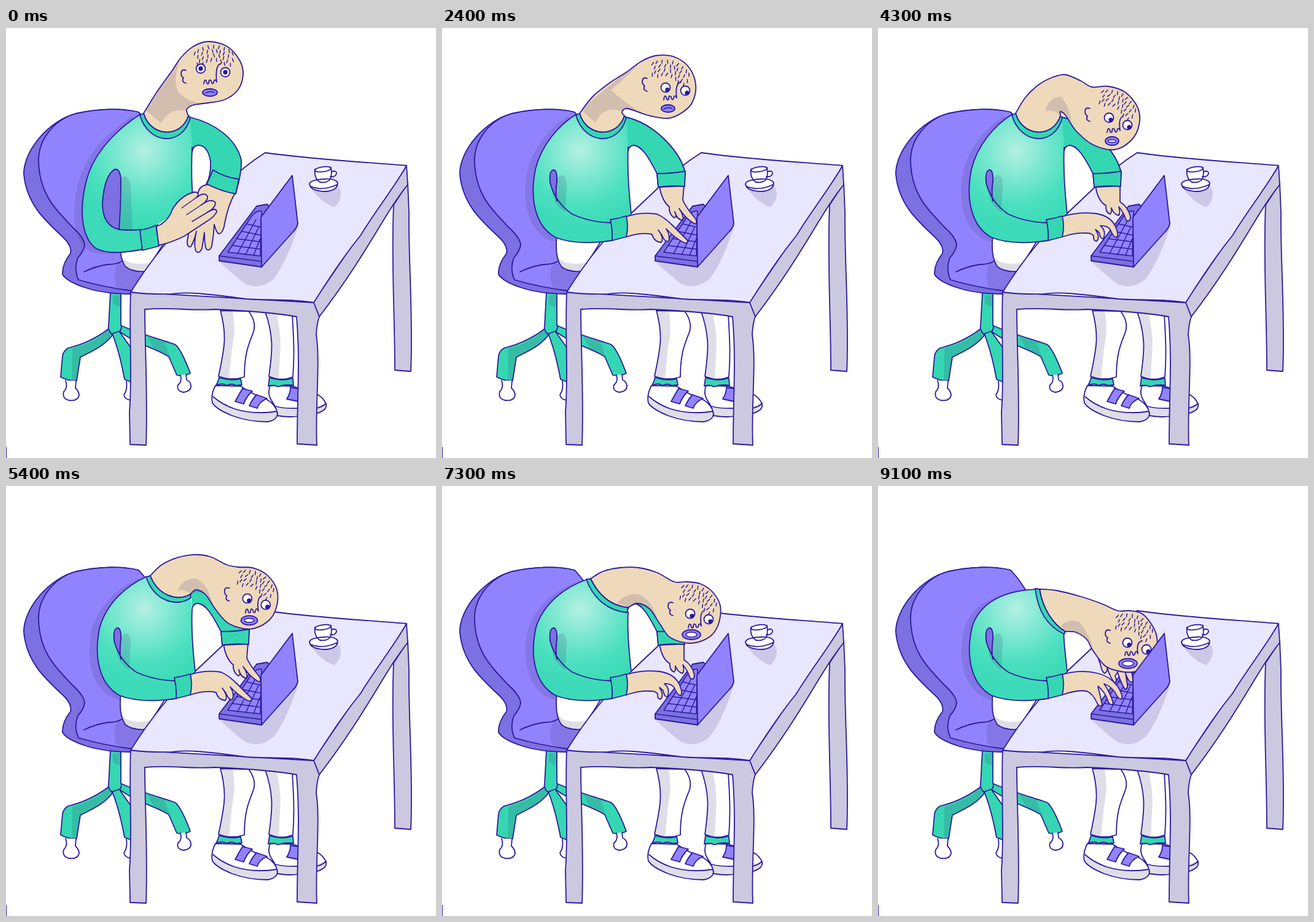
Animation of 700x700 px, one loop 9.17 s. Source, as an HTML page:

```html
<!DOCTYPE html>
<html lang="en">
<head>
<meta charset="utf-8">
<title>Slumping at the desk</title>
<style>
html, body { margin: 0; width: 100%; height: 100%; overflow: hidden; background: #fff; }
svg { display: block; width: 100vw; height: 100vh; }
path, ellipse, circle { fill: none; stroke: #2b1a9c; stroke-width: 1.8; stroke-linejoin: round; stroke-linecap: round; }
.violet { fill: #9183fd; } .deep { fill: #7d70e2; }
.teal { fill: #34d7b1; } .shirt { fill: url(#dye); stroke: none; }
.skin { fill: #efd9bb; } .white { fill: #fff; }
.top { fill: #e9e6ff; } .side { fill: #cbc8e0; } .ink { fill: #2b1a9c; }
.shade { fill: #403a70; fill-opacity: .17; stroke: none; }
.thin { stroke-width: 1.5; }
.bare { stroke: none; }
</style>
</head>
<body>
<svg viewBox="0 0 700 700">
<defs>
  <radialGradient id="dye" gradientUnits="userSpaceOnUse" cx="225" cy="200" r="125">
    <stop offset="0" stop-color="#b4f1e3"/><stop offset=".35" stop-color="#7ee8d1"/>
    <stop offset=".7" stop-color="#4be0bf"/><stop offset="1" stop-color="#3cdab8"/>
  </radialGradient>
</defs>
<path class="ink bare" d="M0,682h1v18h-1z"/>

<!-- chair -->
<path class="teal" d="M173,498C182,520 188,545 193,572L203,576V520L183,492Z"/>
<path class="teal" d="M184,483C215,497 245,505 275,515Q285,522 300,562Q290,568 278,565L265,535C245,522 215,516 183,493Z"/>
<path class="teal" d="M168,489C150,503 130,514 101,521Q93,526 92,534L89,568Q101,575 115,574L121,536C140,526 160,518 174,499Z"/>
<path class="teal" d="M170,430L167,485Q165,491 172,498L186,493Q189,488 187,483L187,430Z"/>
<path class="shade" d="M108,522Q145,512 167,491L173,499C160,518 140,526 121,536L115,573L107,573Q108,535 108,522M230,502L258,511L266,534L240,521ZM174,435H186V455L174,450Z"/>
<path class="white" d="M97,574Q101,585 94,592Q91,603 102,606Q117,608 119,598Q119,592 113,586L114,574M284,565Q287,576 280,581Q277,591 289,593Q302,591 301,582Q300,575 294,573L293,564M196,575Q198,589 192,597Q193,605 204,606"/>
<path class="deep" d="M216,137C190,130 150,131 115,139C70,150 28,200 29,238C33,285 62,312 90,338Q108,354 105,367Q91,385 92,401Q99,413 130,423Q160,433 206,433L250,400L241,170Z"/>
<path class="violet" d="M216,137C190,130 150,131 115,139C75,150 52,185 53,218C55,270 78,292 108,324Q128,342 128,354Q126,364 117,374Q110,392 118,410C145,418 175,424 206,428L250,395L241,171Q232,154 216,137Z"/>
<path class="shade" d="M182,380Q172,402 180,422L206,428L226,397Q198,398 190,385Z"/>
<path d="M127,397Q145,388 165,385Q180,385 188,380"/>
<g id="cast"></g>

<!-- trousers and shoes -->
<path class="white" d="M187,338Q183,372 194,388Q205,398 228,396L260,345Z"/>
<path class="shade" d="M187,372Q188,389 202,394L228,395L236,382Q200,388 187,372Z"/>
<path class="white" d="M349,460C360,500 356,520 346,567Q368,575 388,568C388,530 395,515 402,497Q409,480 395,461ZM422,462C437,505 433,530 428,567Q448,576 467,568C470,530 468,500 466,466Z"/>
<path class="shade" d="M350,461H369Q375,490 368,520L363,571L347,567C357,520 360,500 350,461M423,463H440Q449,500 446,530L444,572L429,567C434,530 436,500 423,463"/>
<path class="white" d="M341,582Q333,597 336,610Q341,620 368,631Q395,641 426,641Q442,638 442,627Q439,613 425,605Q400,596 382,583ZM430,582Q425,595 432,606Q442,620 442,631Q465,635 480,631L507,627Q523,622 521,612Q515,598 500,594L466,583Z"/>
<path class="shade" d="M337,604Q352,613 372,620Q405,630 441,625Q442,637 426,640Q390,640 350,623Q338,616 337,604M441,618Q470,625 520,612Q520,622 506,626Q470,635 443,630Z"/>
<path d="M337,600Q350,612 372,620Q405,630 441,624M439,616Q455,620 475,619M505,619Q515,617 521,611"/>
<path class="teal" d="M347,569Q345,576 342,582Q352,577 359,582Q367,578 374,582L384,581L382,571Q365,575 347,569M429,569L427,583Q436,580 443,584Q455,579 468,582L467,570Q448,576 429,569"/>
<path class="violet" d="M385,587L401,591Q391,600 387,612L373,608Q379,597 385,587M408,597L425,603Q412,609 409,619L396,615Q401,604 408,597M463,585L476,587V608L457,604Q463,595 463,585"/>

<!-- desk -->
<path class="side" d="M631,288C627,380 633,470 633,557L659,559C663,470 655,380 656,300L654,253Z"/>
<path class="side" d="M500,447L652,224L654,255C615,303 590,365 510,470Z"/>
<path class="side" d="M203,430C200,500 206,560 201,625L202,678L228,679C231,600 226,520 226,458C270,454 300,461 340,458Q430,462 473,470C479,540 474,600 474,677L506,679C503,620 512,540 505,500Q506,480 510,470L501,447Z"/>
<path class="top" d="M203,430C225,395 250,360 282,326Q310,300 350,262Q385,226 422,203C500,214 580,218 652,224C635,255 600,300 577,338Q545,377 501,447C460,440 430,444 390,441C350,436 300,428 270,433Q235,434 203,430Z"/>
<path class="shade" d="M347,380Q370,402 390,417Q415,427 436,408Q457,380 475,325L416,380ZM494,257Q510,282 534,292Q546,282 545,266Q540,253 528,246Z"/>
<path class="white" d="M494,254Q496,266 522,266Q540,264 540,252Q535,244 517,246Q495,247 494,254M496,258Q515,266 539,255M530,234Q538,231 538,237Q536,243 528,242M503,230Q501,244 511,251Q522,253 528,246Q531,240 529,227Z"/>
<ellipse class="white" cx="516" cy="230" rx="13" ry="4" transform="rotate(-8 516 230)"/>

<!-- laptop base -->
<path class="deep" d="M347,371L408,290L425,287L440,300L416,389L347,379Z"/>
<path class="violet thin" d="M361,365L400,306Q407,297 416,298L414,371Z"/>
<path class="thin" d="M347,371L416,380M368,354L414,360M376,343L414,348M384,331L414,337M392,319L414,324M377,367L407,312M390,369L411,325M403,370L414,343"/>
<g id="person"></g>
<path class="violet" d="M466,240L475,318Q474,325 468,331L416,389L415,308Z"/>
</svg>
<script>
const $ = id => document.getElementById(id);
const path = (d, cls = '') => `<path class="${cls}" d="${d}"/>`;
const dot = (x, y, r, cls) => `<circle class="${cls}" cx="${x}" cy="${y}" r="${r}"/>`;
const nums = s => s.match(/-?[\d.]+/g).map(Number);

// Upright collar and leaning left side, shared by several poses
const collar = '235,178 285,180 218,142 232,191 288,193 300,146';
const leanArm = 'C143,275 150,322 185,341 C215,353 250,350 277,346';
const leanLeft = 'M219,140 C190,158 162,190 152,230 ' + leanArm;

// face: ear, left eye, right eye, nose, mouth, mouth size, mouth opening, pupil shift, hair centre, hair angle
const poses = {
  rest: {
    head: '224,139 245,105 270,70 285,48 305,30 330,22 360,30 380,52 386,75 378,100 355,117 320,123 303,126 294,133 297,143',
    collar, side: '303,194',
    left: 'M219,140 C185,162 150,195 135,235 C120,280 118,335 145,358 C165,370 200,366 248,355',
    face: '289,79 317,66 357,72 332,88 332,105 12,6 0 0 338,74 0',
    shade: 'M228,134 Q250,100 283,52 Q270,88 281,105 Q298,121 318,123 Q298,126 294,135 Q268,128 252,155 Z'
  },
  type: {
    head: '224,139 245,112 272,90 300,72 325,54 348,45 378,47 402,64 413,92 408,120 392,137 368,147 335,142 302,131 293,137 297,143',
    collar, side: '303,194', left: leanLeft,
    face: '330,92 364,97 396,102 371,114 368,131 11,6 0 3 363,98 17',
    shade: 'M228,134 Q265,96 322,57 Q300,80 275,101 Q300,124 330,141 Q300,130 294,136 Q262,125 250,155 Z'
  },
  sink: {
    head: '224,139 240,113 262,92 285,80 305,76 330,86 348,96 375,95 403,105 423,130 425,158 412,183 385,198 350,190 322,167 306,143 297,136 297,143',
    collar, side: '303,194', left: leanLeft,
    face: '341,141 376,146 406,158 383,167 381,184 11,7 2 3 376,147 30',
    shade: 'M297,143 Q285,131 272,136 Q278,112 298,112 Q312,128 315,155 Q304,132 297,143 Z'
  },
  bow: {
    head: '242,151 262,139 290,133 320,133 350,141 378,156 398,156 420,159 440,172 453,195 450,225 435,246 405,256 372,247 355,225 338,200 318,191 303,198',
    collar: '255,178 275,195 235,152 246,183 270,203 301,206', side: '303,205',
    left: 'M236,152 C200,165 166,190 153,230 ' + leanArm,
    face: '372,200 404,208 434,217 411,228 406,242 15,8 4 3 404,207 28',
    shade: 'M303,198 Q292,191 284,193 Q295,175 318,176 Q340,182 350,215 Q330,186 303,198 Z'
  },
  crash: {
    head: '263,168 290,170 330,180 365,192 390,203 410,203 430,208 447,228 454,247 453,272 440,292 420,302 395,302 370,293 350,268 340,250 322,238 305,237',
    collar: '268,200 285,225 256,167 260,203 275,228 303,241', side: '303,240',
    left: 'M257,168 C205,170 165,190 153,230 ' + leanArm,
    face: '374,245 406,255 437,266 412,273 407,289 15,8 4 3 406,254 22',
    shade: 'M305,237 Q300,231 298,228 Q310,214 328,222 Q342,238 352,268 Q340,236 305,237 Z'
  }
};

const blend = (a, b, t) => Object.fromEntries(Object.keys(a).map(key => {
  const to = nums(b[key]);
  let i = 0;
  return [key, a[key].replace(/-?[\d.]+/g, n => +(+n + (to[i++] - n) * t).toFixed(1))];
}));
poses.droop = blend(poses.sink, poses.bow, .6);

const nearHands = [
  'M300,307 Q325,299 350,303 Q362,308 376,322 L400,346 Q400,352 393,349 Q378,341 365,327 Q372,337 369,347 Q363,350 358,337 L352,329 Q362,342 357,349 Q345,348 342,336 Q325,332 300,340Z',
  'M300,307 Q325,299 355,302 Q378,306 386,322 Q393,338 388,341 Q383,340 378,328 Q372,321 362,322 Q372,330 367,343 Q362,344 360,333 L354,328 Q362,340 356,347 Q350,347 351,338 Q345,333 340,334 Q325,332 300,340Z',
  'M300,307 Q330,298 358,305 Q378,310 390,326 Q400,342 396,347 Q391,347 386,336 Q378,325 368,322 Q379,338 383,354 Q380,359 375,352 Q370,335 358,326 Q362,342 365,356 Q361,361 357,354 Q350,338 340,334 Q325,331 300,340Z'
];
const farHands = [
  'M354,257 Q358,282 370,291 Q369,303 378,309 Q383,308 379,299 Q382,312 392,313 Q394,305 386,294 Q398,312 412,319 Q418,316 409,306 Q396,290 392,280 L394,256',
  'M354,257 Q358,282 371,289 Q370,300 378,303 Q381,299 380,293 Q384,304 392,305 Q395,300 392,291 Q400,300 404,313 Q410,317 411,308 Q408,292 394,283 L394,256',
  'M354,257 Q357,278 362,290 Q364,302 369,305 Q374,302 373,296 Q378,312 385,320 Q390,320 386,309 L390,303 Q396,322 402,331 Q408,331 405,318 L403,305 Q407,318 413,320 Q417,318 412,300 Q405,285 395,277 L394,256'
];

function spline(list) {
  const v = nums(list), n = v.length / 2;
  const at = i => { i = Math.max(0, Math.min(n - 1, i)); return [v[2 * i], v[2 * i + 1]]; };
  let d = 'M' + at(0);
  for (let i = 0; i < n - 1; i++) {
    const [a, b, c, e] = [at(i - 1), at(i), at(i + 1), at(i + 2)];
    d += `C${b.map((q, k) => q + (c[k] - a[k]) / 6)} ${c.map((q, k) => q - (e[k] - b[k]) / 6)} ${c}`;
  }
  return d;
}

// Short bristles on four arcs
let bristles = '';
[46, 39, 32, 25].forEach((r, row) => {
  for (let i = -4; i <= 4; i++) {
    const a = (i + row % 2 / 2) * 8 / r + Math.sin(i * 7 + row * 3) * .05;
    if (Math.abs(a) < 1.05) bristles += `M${(r * Math.sin(a)).toFixed(1)},${(-r * Math.cos(a)).toFixed(1)}l${(Math.sin(i * 5 + row) * 2).toFixed(1)},5`;
  }
});

function face(spec) {
  const [ex, ey, lx, ly, rx, ry, nx, ny, mx, my, mw, mh, open, look, hx, hy, turn] = nums(spec);
  const eye = (x, y) => dot(x, y, 7.5, 'white') + dot(x + look, y + look * 1.2, 2.8, 'ink');
  return path(`M${ex + 4},${ey - 10} q-8,-3 -8,6 q1,5 4,6 q-4,7 4,9`)
    + eye(lx, ly) + eye(rx, ry)
    + path(`M${nx - 10},${ny + 3} q1,-9 4,-5 q1,7 4,4 q0,-8 4,-4 q1,7 4,3 q1,-7 4,-3 M${nx + 11},${ny} Q${nx + 8},${ry - 12} ${rx - 7},${ry - 14}`)
    + `<ellipse class="violet" cx="${mx}" cy="${my}" rx="${mw}" ry="${mh}"/>`
    + (open ? `<ellipse class="white thin" cx="${mx}" cy="${my}" rx="${mw * .6}" ry="${open}"/>`
            : path(`M${mx - 7},${my + 1} q7,-4 14,-1`, 'thin'))
    + `<g transform="translate(${hx} ${hy}) rotate(${turn})">${path(bristles, 'thin')}</g>`;
}

function headAndCollar(pose) {
  const v = nums(pose.head), [a, b, c, d, ...outer] = nums(pose.collar);
  const start = v.slice(0, 2), end = v.slice(-2);
  const [p, q, r, s] = [0, 2, 4, 6].map(i => outer.slice(i, i + 2));
  const band = `M${p} C${q} ${r} ${s} L${end} C${c},${d} ${a},${b} ${start}Z`;
  return path(`${spline(pose.head)} C${c},${d} ${a},${b} ${start}Z`, 'skin')
    + path(pose.shade, 'shade') + path(band, 'teal') + face(pose.face);
}

function body(pose, wrist) {
  const shoulder = nums(pose.collar).slice(-2);
  const edge = wrist.split(' ').pop();
  return path(`${pose.left} L${wrist} Q301,240 ${pose.side} L${shoulder}Z`, 'shirt')
    + path(`${pose.left} M${edge} Q301,240 ${pose.side}`);
}

function restPerson(pose) {
  return path('M299,145 C340,155 375,180 383,215 Q384,235 374,269 L326,254 Q334,240 333,217 Q328,190 312,191 Q304,192 303,202', 'teal')
    + body(pose, '245,321 270,305 304,275')
    + path('M328,255 Q315,256 312,270 Q300,310 295,348 Q295,358 301,356 Q307,345 310,331 Q305,352 309,363 Q314,369 319,359 L323,333 Q323,352 326,360 Q332,364 335,355 Q338,338 339,320 Q343,335 347,335 Q354,333 356,318 Q361,290 373,268Z', 'skin')
    + path('M337,231 Q355,243 379,246 L374,270 Q350,266 327,254Z', 'teal')
    + headAndCollar(pose)
    + path('M184,328 Q187,290 187,245 Q185,228 177,230 Q160,240 157,285 Q157,322 184,328Z', 'deep')
    + path('M187,245 Q201,233 203,262 L206,328 L184,328 Z', 'shade')
    + path('M184,328 Q200,330 220,328')
    + path('M245,323 Q264,316 271,295 Q285,272 307,267 Q317,268 310,276 Q323,266 328,274 Q329,281 318,288 Q334,276 341,284 Q341,293 328,300 Q342,291 343,299 Q340,307 325,316 Q305,329 290,339 Q270,349 248,354Z', 'skin')
    + path('M310,276 L286,293 M318,288 L294,304 M328,300 L303,315', 'thin')
    + path('M218,329 Q232,327 244,321 L249,355 L222,362Z', 'teal');
}

function typingPerson(pose, hand) {
  const farSleeve = pose === poses.crash ? ''
    : path('M299,145 C345,155 388,200 396,236 L394,257 L352,259 L350,237 C335,208 325,192 312,191 Q304,192 303,200', 'teal')
    + path('M350,237 Q375,237 396,233 L395,258 Q372,256 352,259Z', 'teal');
  return path(farHands[hand], 'skin') + farSleeve
    + body(pose, '300,340 300,307 308,302')
    + headAndCollar(pose)
    + path('M187,245 Q203,229 203,262 L200,300 Q180,285 180,268Z', 'shade')
    + path('M187,262 Q188,231 181,231 Q174,233 176,252 Q179,265 187,280Z', 'deep bare')
    + path('M187,282 Q184,270 187,250 Q188,231 181,231 Q174,233 176,252 Q184,284 212,303 Q240,316 274,317')
    + path(nearHands[hand], 'skin')
    + path('M274,312 Q288,310 300,306 Q304,323 300,340 L277,346 Q278,330 274,312Z', 'teal');
}

// First tick of each pose and its order of hand positions
const script = [[0, 'rest'], [10, 'type', '012'], [29, 'sink', '012'], [50, 'droop', '012'], [61, 'bow', '012'], [74, 'crash', '021']];
let shown = -1;

function draw(now) {
  const tick = Math.floor(now % 9170 / 100);
  if (tick !== shown) {
    shown = tick;
    const [, name, order] = script.filter(([from]) => from <= tick).pop();
    const pose = poses[name];
    $('cast').innerHTML = `<g transform="translate(-13 3)">${path(pose.left + 'Z', 'shade')}</g>`;
    $('person').innerHTML = order ? typingPerson(pose, order[tick % 3]) : restPerson(pose);
  }
  requestAnimationFrame(() => draw(performance.now()));
}
draw(0);
</script>
</body>
</html>
```
